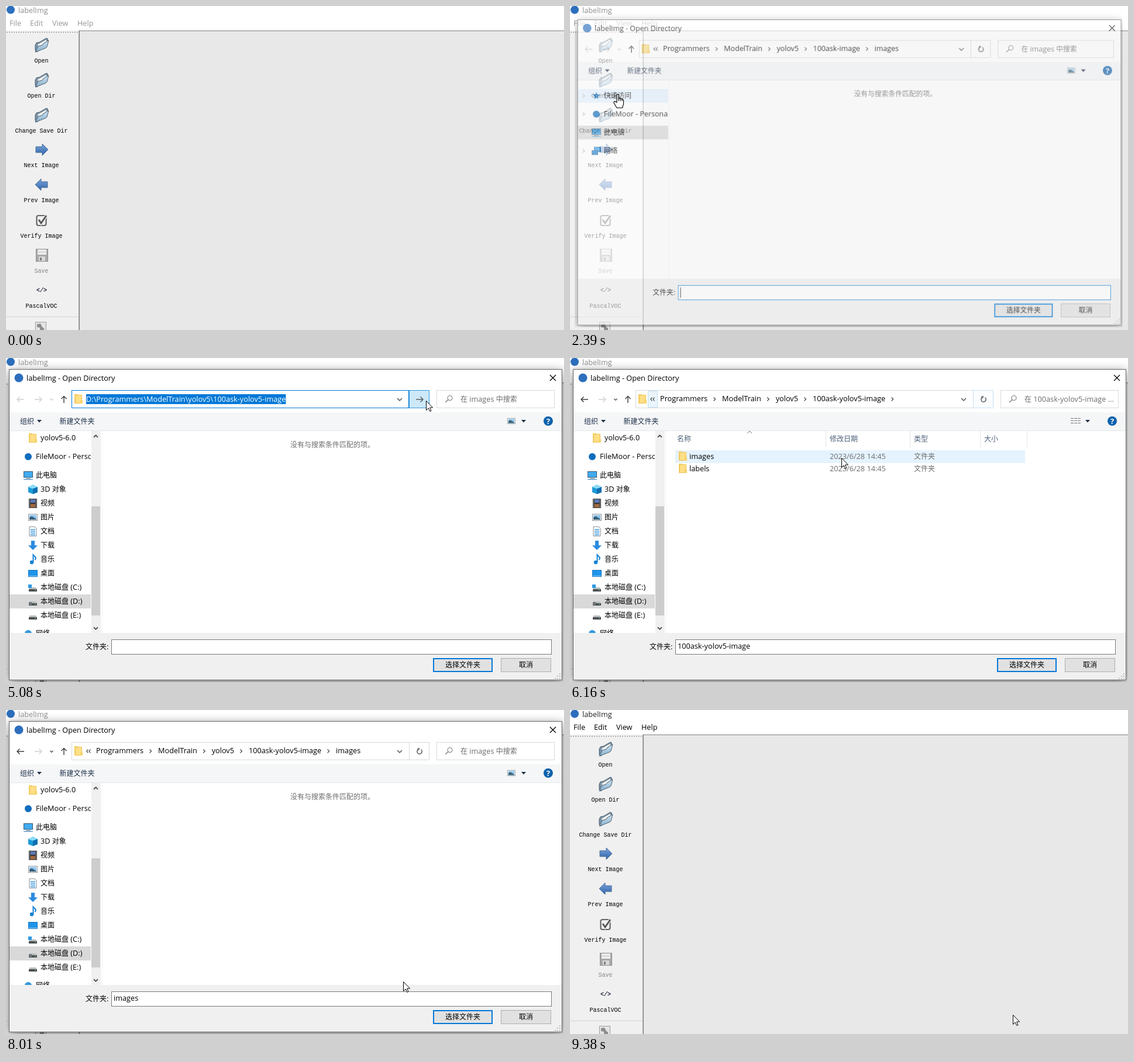
Write an HTML page with a canvas that moves like this. It is 954 px wide and 555 px high and loops after 9450 ms.

```html
<!DOCTYPE html>
<html lang="zh">
<head>
<meta charset="utf-8">
<title>labelImg</title>
<style>
html, body { margin: 0; width: 100%; height: 100%; overflow: hidden; background: #fff; }
canvas { display: block; }
</style>
</head>
<body>
<canvas id="stage" width="954" height="555"></canvas>
<script>
const W = 954, H = 555, LOOP = 9450;
const screen = document.getElementById('stage').getContext('2d');
const layer = document.createElement('canvas');
layer.width = W;
layer.height = H;
const sheet = layer.getContext('2d');
let c = screen;

const LATIN = '12.7px "Open Sans", "Noto Sans", sans-serif';
const HAN = '12px "Noto Sans CJK SC", "Noto Sans CJK", sans-serif';
const MONO = '10px "Liberation Mono", monospace';
const GRAY = '#6d6d6d', BLUE = '#0078d7', NAVY = '#1e2f4a';

// ---- drawing helpers ----
function box(x, y, w, h, fill, line, lw = 1) {
  if (fill) { c.fillStyle = fill; c.fillRect(x, y, w, h); }
  if (line) {
    c.strokeStyle = line;
    c.lineWidth = lw;
    c.strokeRect(x + lw / 2, y + lw / 2, w - lw, h - lw);
  }
}
function trace(p, close) {
  c.beginPath();
  for (let i = 0; i < p.length; i += 2) c.lineTo(p[i], p[i + 1]);
  if (close) c.closePath();
}
function poly(p, fill, line, lw = 1) {
  trace(p, true);
  if (fill) { c.fillStyle = fill; c.fill(); }
  if (line) { c.strokeStyle = line; c.lineWidth = lw; c.stroke(); }
}
function path(p, color, lw = 1) {
  trace(p);
  c.strokeStyle = color;
  c.lineWidth = lw;
  c.stroke();
}
function dot(x, y, r, color) {
  c.beginPath();
  c.arc(x, y, r, 0, 7);
  c.fillStyle = color;
  c.fill();
}
function ramp(y0, y1, a, b) {
  const g = c.createLinearGradient(0, y0, 0, y1);
  g.addColorStop(0, a);
  g.addColorStop(1, b);
  return g;
}
function at(x, y, draw) {
  c.save();
  c.translate(x, y);
  draw();
  c.restore();
}
const runs = s => s.match(/[\u3000-\u9fff]+|[^\u3000-\u9fff]+/g) || [];
const pick = r => { c.font = /[\u3000-\u9fff]/.test(r) ? HAN : LATIN; };
function width(s) {
  return runs(s).reduce((w, r) => { pick(r); return w + c.measureText(r).width; }, 0);
}
// y is the middle of the line; the baseline sits on a whole pixel
function text(s, x, y, color = '#000', centered) {
  if (centered) x -= width(s) / 2;
  c.textAlign = 'left';
  for (const r of runs(s)) {
    pick(r);
    c.fillStyle = color;
    c.fillText(r, x, Math.round(y + 4.2));
    x += c.measureText(r).width;
  }
}
const right = (x, y, col, r = 3) => path([x - r / 2, y - r, x + r / 2, y, x - r / 2, y + r], col, 1.2);
const down = (x, y, col, r = 4, lw = 1.5) => path([x - r, y - r / 2, x, y + r / 2, x + r, y - r / 2], col, lw);
const up = (x, y, col, r = 4, lw = 1.5) => path([x - r, y + r / 2, x, y - r / 2, x + r, y + r / 2], col, lw);
const tri = (x, y) => poly([x - 4, y - 2, x + 4, y - 2, x, y + 2.5], NAVY);
function arrow(x, y, dir, col) {
  path([x - 6, y, x + 6, y], col, 1.4);
  path([x + dir * 1.5, y - 4.5, x + dir * 6, y, x + dir * 1.5, y + 4.5], col, 1.4);
}

// ---- main window ----
function openIcon() {
  poly([-11, 0, -9, -4, -4, -5, 8, -12, 10, -11, 11, -6, -8, 12, -11, 9], '#7d95aa', '#465a6c');
  poly([-7, -1, 7, -9, 10, -6, -5, 7], '#fbfbf6', '#9aa3aa', 0.8);
  poly([-11, 12, -6, 2, 1, 0, 3, -3, 12, -8, 9, 3, 7, 5], ramp(-8, 12, '#cfe3f2', '#86aeca'), '#4c6274');
}
function moveIcon(dir) {
  c.scale(dir, 1);
  poly([-10, -5, 1, -5, 1, -10, 11, 0, 1, 10, 1, 5, -10, 5], ramp(-10, 10, '#7ba7dc', '#2f62aa'), '#4a6c98');
}
function checkIcon() {
  c.beginPath();
  c.roundRect(-8.5, -8, 16, 17, 3);
  c.strokeStyle = '#666';
  c.lineWidth = 2.2;
  c.stroke();
  path([-5, -1, -1, 5, 8, -8], '#f0f0f0', 5);
  path([-5, -1, -1, 5, 8, -8], '#555', 2.8);
}
function saveIcon() {
  box(-10, -11, 21, 22, '#a9a9a9', '#8c8c8c');
  box(-7, -10, 15, 9, '#ececec');
  box(-6, -6, 13, 1, '#c2c2c2');
  box(-5, 2, 11, 8, '#d8d8d8');
  box(-3, 4, 3, 5, '#808080');
}
function codeIcon() {
  c.font = 'italic bold 10px "Liberation Mono", monospace';
  c.fillStyle = '#1d2238';
  c.textAlign = 'center';
  c.fillText('</>', 0, 3);
}
const tools = [
  ['Open', 67, openIcon], ['Open Dir', 127, openIcon], ['Change Save Dir', 187, openIcon],
  ['Next Image', 246, () => moveIcon(1)], ['Prev Image', 306, () => moveIcon(-1)],
  ['Verify Image', 367, checkIcon], ['Save', 427, saveIcon], ['PascalVOC', 487, codeIcon]
];
function mainWindow(active) {
  const ink = active ? '#000' : '#939a93';
  box(0, 0, W, H, '#fff');
  dot(8, 6.5, 7, '#2d6fbd');
  text('labelImg', 21, 7.5, active ? '#222' : '#8d8d8d');
  [['File', 6], ['Edit', 41], ['View', 79], ['Help', 122]].forEach(m => text(m[0], m[1], 29.5, ink));
  box(0, 42, 125, 513, '#f0f0f0');
  for (let x = 1; x < 123; x += 4) box(x, 44, 2, 2, '#b4b4b4');
  box(124, 42, 830, 513, '#e8e8e8');
  box(124, 42, 830, 1, '#828282');
  box(124, 42, 1, 513, '#a8a8a8');
  box(125, 42, 1, 513, '#828282');
  for (const [name, y, icon] of tools) {
    at(61, y, icon);
    c.font = MONO;
    c.textAlign = 'center';
    c.fillStyle = name === 'Save' ? '#858585' : '#000';
    c.fillText(name, 60.5, y + 30);
  }
  box(1, 532, 122, 1, '#cfcfcf');
  c.setLineDash([1, 1]);
  box(50, 541, 19, 20, '#e4e4e4', '#555');
  c.setLineDash([]);
  poly([53, 545, 59, 544, 62, 550, 65, 552, 65, 556, 58, 556, 58, 551, 53, 550], '#8d8d8d');
}

// ---- dialog ----
function folder(x, y) {
  box(x, y - 8, 6, 16, '#f5cf63');
  box(x + 1, y - 7, 12, 15, '#ffdf85', '#edc45a');
  box(x + 10, y + 2, 4, 6, '#f7d36e');
}
const navIcons = {
  cube() {
    poly([0, -8, 8, -4, 8, 5, 0, 8, -8, 5, -8, -4], '#1c9bd8');
    poly([0, -8, 8, -4, 0, -1, -8, -4], '#8fdcf7');
    poly([0, -1, 8, -4, 8, 5, 0, 8], '#0d6fb0');
  },
  film() {
    box(-7, -8, 14, 16, '#333');
    box(-4, -7, 8, 6, '#5d79b8');
    box(-4, 1, 8, 6, '#a2683f');
    for (let y = -7; y < 8; y += 3) { box(-6, y, 1, 1.5, '#fff'); box(5, y, 1, 1.5, '#fff'); }
  },
  photo() {
    box(-8, -6, 16, 12, '#fff', '#8b9299');
    box(-6, -4, 12, 8, '#8fc5ee');
    poly([-6, 4, -6, 0, -2, -2, 6, 3, 6, 4], '#3a6279');
  },
  doc() {
    poly([-6, -8, 3, -8, 6, -5, 6, 8, -6, 8], '#fff', '#808a94');
    for (let y = -4; y < 7; y += 3) box(-4, y, 8, 1.5, '#3f9be0');
  },
  load() { poly([-3, -8, 3, -8, 3, 0, 8, 0, 0, 8, -8, 0, -3, 0], '#2b8be0'); },
  note() {
    dot(-2, 5, 3.2, '#1583d6');
    path([0.5, 5, 0.5, -8, 5, -3, 4, 1], '#1583d6', 2);
  },
  desk() {
    box(-8, -6, 16, 12, '#1d95ea', '#1477c2');
    box(-7, 4, 14, 1, '#9fd5fb');
  },
  pc() {
    box(-8, -7, 16, 11, '#41aaf0', '#3a5b78');
    box(-4, 5, 8, 1, '#6c7f8e');
    box(-8, 6, 16, 2, '#8ab9d8');
  },
  disk() {
    poly([-5, 0, 5, 0, 7, 3, -7, 3], '#b9bdc0');
    box(-7, 3, 14, 4, '#4b4f52');
    box(3, 4, 2, 1, '#7fe08a');
  },
  sysDisk() { navIcons.disk(); box(-8, -5, 6, 6, '#2a9ae3'); },
  dataDisk() { navIcons.disk(); box(-7, 1, 5, 5, '#70767a'); },
  net() {
    box(-4, -7, 12, 9, '#3fa3e8', '#2e6c9c');
    box(-8, -1, 11, 8, '#2585cf', '#2e6c9c');
  },
  globe() { dot(0, 0, 6, '#3498db'); box(2, 0, 6, 6, '#2a72a8'); },
  cloud() { dot(0, 0, 6, '#0f6cbd'); },
  star() {
    const p = [];
    for (let i = 0; i < 10; i++) {
      const r = i % 2 ? 3 : 7, a = i * Math.PI / 5 - Math.PI / 2;
      p.push(r * Math.cos(a), r * Math.sin(a));
    }
    poly(p, '#2f8fdd');
  }
};
const places = [
  ['3D 对象', 'cube'], ['视频', 'film'], ['图片', 'photo'], ['文档', 'doc'], ['下载', 'load'],
  ['音乐', 'note'], ['桌面', 'desk'], ['本地磁盘 (C:)', 'sysDisk'],
  ['本地磁盘 (D:)', 'dataDisk'], ['本地磁盘 (E:)', 'disk']
];
function entry(name, icon, x, y) {
  at(x, y, navIcons[icon]);
  text(name, x + 13, y);
}
function shortNav(s) {
  if (s.hover) box(6, 140, 157, 24, '#e5f3ff');
  box(6, 204, 157, 24, '#d9d9d9');
  [['快速访问', 'star', 152], ['FileMoor - Personal', 'cloud', 184], ['此电脑', 'pc', 216], ['网络', 'net', 248]]
    .forEach(([n, i, y]) => { entry(n, i, 38, y); right(16, y, '#b5b5b5'); });
}
function treeNav(s) {
  const fade = `rgba(150,150,150,${s.chev})`;
  box(6, 405, 139, 24, '#d9d9d9');
  folder(39, 137);
  text('yolov5-6.0', 59, 137);
  entry('FileMoor - Personal', 'cloud', 38, 169);
  entry('此电脑', 'pc', 38, 201);
  places.forEach(([n, i], k) => {
    at(46, 225 + 24 * k, navIcons[i]);
    text(n, 59, 225 + 24 * k);
    right(24, 225 + 24 * k, fade);
  });
  entry('网络', 'globe', 38, 472);
  right(16, 169, fade);
  right(16, 472, fade);
  down(16, 201, fade);
}
function address(s) {
  box(112, 55, 612, 31, '#fff', '#d9d9d9');
  box(689, 55, 1, 31, '#d9d9d9');
  if (s.focus) box(112, 55, 577, 31, '#fff', BLUE);
  folder(117, 70);
  if (s.path) {
    if (s.sel) box(137, 62, width(s.path), 17, BLUE);
    text(s.path, 137, 70.5, s.sel ? '#fff' : '#000');
    if (s.focus && !s.sel) box(138 + width(s.path), 62, 1, 17, '#000');
  } else {
    if (s.glow) box(133, 56, 17, 29, '#e9f4fc', '#c4e2f6');
    for (const x of [140.5, 144.5]) path([x, 67.5, x - 2.5, 70.5, x, 73.5], '#222', 1.1);
    let x = 154;
    s.crumbs.forEach((name, i) => {
      text(name, x, 70);
      x += width(name) + 12;
      if (i < s.crumbs.length - 1 || s.list) right(x, 70.5, '#444');
      x += 13;
    });
  }
  down(673, 71, '#555');
  if (s.go) {
    if (s.go > 1) box(689, 55, 35, 31, '#cce8f9', '#3296dc');
    arrow(707, 71, 1, '#555');
  } else {
    if (s.glow) box(689, 55, 35, 31, '#fbfdff', '#c8e0f2');
    c.beginPath();
    c.arc(707, 71, 4.2, -0.9, 4);
    c.strokeStyle = '#666';
    c.lineWidth = 1.6;
    c.stroke();
    poly([703, 65.5, 708, 65.5, 704.5, 70], '#666');
  }
}
function fileList(s) {
  [['名称', 183], ['修改日期', 444], ['类型', 588], ['大小', 708]].forEach(h => text(h[0], h[1], 139, '#4c607a'));
  [437, 581, 701, 781].forEach(x => box(x, 125, 1, 28, '#e5e5e5'));
  up(307, 127, '#777', 4, 1);
  if (s.row) box(180, 158, 598, 22, s.row > 1 ? '#cce8ff' : '#e5f3ff');
  ['images', 'labels'].forEach((n, i) => {
    const y = 169 + 21 * i;
    folder(186, y - 1);
    text(n, 204, y);
    text('2023/6/28 14:45', 444, y, GRAY);
    text('文件夹', 588, y, GRAY);
  });
}
function dialog(s) {
  c.clearRect(0, 0, W, H);
  c.save();
  c.shadowColor = 'rgba(0,0,0,.5)';
  c.shadowBlur = 16;
  c.shadowOffsetY = 4;
  box(5, 19, 946, 533, '#fff');
  c.restore();
  box(5, 19, 946, 533, '#fff', '#666');
  dot(22, 34, 7.5, '#2d6fbd');
  text('labelImg - Open Directory', 35, 34.5);
  path([930, 29, 940, 39], '#000', 1.3);
  path([940, 29, 930, 39], '#000', 1.3);

  arrow(25, 71, -1, s.back ? '#333' : '#cfcfcf');
  arrow(55, 71, 1, '#cfcfcf');
  down(78, 71, s.back ? '#555' : '#cfcfcf', 2.5);
  path([99, 65, 99, 77], '#444', 1.5);
  path([94.5, 70, 99, 65.5, 103.5, 70], '#444', 1.5);
  address(s);
  box(736, 55, 202, 31, '#fff', '#d9d9d9');
  c.beginPath();
  c.arc(759, 68.5, 4, 0, 7);
  c.strokeStyle = '#777';
  c.lineWidth = 1.1;
  c.stroke();
  path([756, 71.5, 751, 76], '#777', 1.2);
  text(s.list ? '在 100ask-yolov5-image ...' : '在 images 中搜索', 777, 71, GRAY);

  box(6, 93, 944, 31, '#f5f6f7');
  box(6, 124, 944, 1, '#e3e6e9');
  text('组织', 24, 108.5, NAVY);
  tri(57, 108);
  text('新建文件夹', 91.5, 108.5, NAVY);
  if (s.list) {
    for (let y = 103; y < 113; y += 4) for (let x = 856; x < 872; x += 6) box(x, y, 5, 1, '#777');
  } else at(864, 108, () => { c.scale(0.85, 0.85); navIcons.photo(); });
  tri(885, 108);
  dot(927, 108, 8, '#1062ad');
  c.font = 'bold 13px "Open Sans", sans-serif';
  c.textAlign = 'center';
  c.fillStyle = '#fff';
  c.fillText('?', 927, 113);

  c.save();
  c.beginPath();
  c.rect(6, 125, s.tree ? 139 : 157, 346);
  c.clip();
  (s.tree ? treeNav : shortNav)(s);
  c.restore();
  if (s.tree) {
    box(146, 125, 16, 346, '#f0f0f0');
    box(146, 254, 15, 187, '#cdcdcd');
    up(153.5, 134, '#505050', 3.5, 1.8);
    down(153.5, 463, '#505050', 3.5, 1.8);
  }
  box(164, 125, 1, 346, '#f5f5f5');
  if (s.list) fileList(s);
  else text('没有与搜索条件匹配的项。', 486, 149, GRAY);

  box(6, 471, 944, 80, '#f0f0f0');
  text('文件夹:', 136, 495);
  box(180, 482, 753, 26, '#fff', s.edit ? BLUE : '#7a7a7a');
  if (s.caret) box(184, 486, 1, 18, '#000');
  text(s.field, 184, 494);
  box(730, 514, 102, 24, s.press ? '#d3e8f8' : '#e1e1e1', BLUE, 2);
  text('选择文件夹', 781, 526, '#000', true);
  box(846, 514, 86, 24, '#e1e1e1', '#adadad');
  text('取消', 889, 526, '#000', true);
  for (let i = 0; i < 3; i++)
    for (let j = 0; j <= i; j++) box(946 - 4 * j, 540 + 4 * i, 2, 2, '#bfbfbf');
}

// ---- pointers ----
function pointer() {
  poly([0.5, 0.5, 0.5, 16.5, 4.2, 13, 6.8, 18.5, 9, 17.5, 6.6, 12, 11.5, 12], '#fff', '#000');
}
function hand() {
  c.beginPath();
  c.moveTo(-2, 14);
  c.lineTo(-2, 1.5);
  c.arc(-0.5, 1.5, 1.5, Math.PI, 0);
  c.lineTo(1, 8);
  c.quadraticCurveTo(3, 5.5, 4, 8.5);
  c.quadraticCurveTo(6, 6, 7, 9.5);
  c.quadraticCurveTo(9.5, 8, 9.5, 11);
  c.lineTo(9.5, 17);
  c.lineTo(7.5, 23.5);
  c.lineTo(-2, 23.5);
  c.lineTo(-7, 15);
  c.quadraticCurveTo(-7, 11, -4, 13);
  c.closePath();
  c.fillStyle = '#fff';
  c.fill();
  c.strokeStyle = '#000';
  c.lineWidth = 1.1;
  c.stroke();
  for (const x of [1, 4, 7]) path([x, 8.5, x, 12], '#000');
}

// ---- timeline: start time, pointer position, state changes ----
const root = 'D:\\Programmers\\ModelTrain\\yolov5\\';
const base = ['Programmers', 'ModelTrain', 'yolov5'];
const scenes = [
  [0, null, { crumbs: [...base, '100ask-image', 'images'], field: '', chev: 0.7, edit: 1, show: 0 }],
  [780, [253, 291], {}],
  [1050, [160, 214], {}],
  [1310, [82, 151], { hand: 1, active: 1 }],
  [1870, [82, 151], { active: 0 }],
  [2390, [82, 151], { show: 0.65, hover: 1, caret: 1 }],
  [2650, [82, 151], { show: 1, hand: 0 }],
  [2920, [252, 132], { tree: 1, hover: 0, caret: 0 }],
  [3220, [470, 86], {}],
  [3490, [576, 70], { path: root + '100ask-image\\images' }],
  [3750, [576, 70], { sel: 1, focus: 1, edit: 0, chev: 0.3 }],
  [4010, [576, 70], { chev: 0 }],
  [4280, [577, 71], { path: root + '100ask-yolov5-image', sel: 0, go: 1 }],
  [4560, [610, 72], {}],
  [4830, [676, 73], {}],
  [5080, [718, 73], { sel: 1, go: 2 }],
  [5630, [716, 74], { path: '', sel: 0, focus: 0, go: 0, glow: 1, back: 1, list: 1,
    crumbs: [...base, '100ask-yolov5-image'], field: '100ask-yolov5-image' }],
  [5890, [580, 130], {}],
  [6160, [464, 171], { row: 1 }],
  [6420, [464, 171], { glow: 0, row: 2 }],
  [6950, [464, 171], { list: 0, row: 0, field: 'images', crumbs: [...base, '100ask-yolov5-image', 'images'] }],
  [7220, [482, 210], {}],
  [7480, [548, 310], {}],
  [7740, [624, 405], {}],
  [8010, [679, 465], {}],
  [8270, [742, 512], {}],
  [8550, [757, 522], { press: 1 }],
  [8810, [757, 522], { show: 0, active: 1 }]
];
let acc = {};
for (const s of scenes) s[2] = acc = { ...acc, ...s[2] };

function render(now) {
  const t = now % LOOP;
  const [, pos, s] = scenes.findLast(k => k[0] <= t);
  c = screen;
  mainWindow(s.active);
  if (s.show) {
    c = sheet;
    dialog(s);
    c = screen;
    c.save();
    if (s.show < 1) {
      c.globalAlpha = s.show;
      c.translate(478, 285);
      c.scale(0.983, 0.983);
      c.translate(-478.5, -285.5);
    }
    c.drawImage(layer, 0, 0);
    c.restore();
  }
  if (pos) at(pos[0], pos[1], s.hand ? hand : pointer);
  requestAnimationFrame(render);
}
render(0);
</script>
</body>
</html>
```
